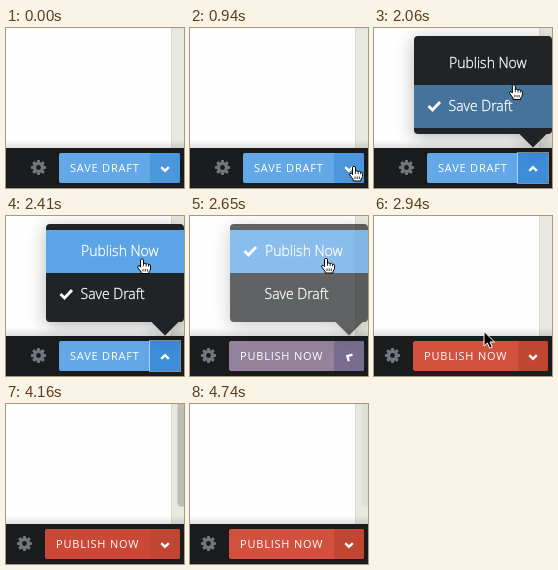
An HTML page for the animation above (4860 ms loop, 178 by 160 pixels).

```html
<!DOCTYPE html>
<html lang="en">
<head>
<meta charset="utf-8">
<title>Publish button</title>
<style>
  html, body { margin: 0; width: 100%; height: 100%; overflow: hidden; background: #fefefe; }
  svg { display: block; width: 100%; height: 100%; }
  text { font-family: "Open Sans", sans-serif; fill: #fff; }
  .label { font-size: 11px; letter-spacing: .8px; }
  .item { font-size: 14px; font-weight: 300; stroke: #fff; stroke-width: .3; }
  .icon { fill: none; stroke: #fff; stroke-width: 2.3; }
  #menu { filter: drop-shadow(0 4px 9px rgba(0, 0, 0, .28)); }
</style>
</head>
<body>
<svg viewBox="0 0 178 160">
  <defs>
    <linearGradient id="fade" x1="0" y1="0" x2="0" y2="1">
      <stop offset="0" stop-color="#000" stop-opacity="0"/>
      <stop offset="1" stop-color="#000" stop-opacity=".12"/>
    </linearGradient>
  </defs>

  <rect width="178" height="160" fill="#fefefe"/>
  <rect x="165" width="13" height="120" fill="#e9e8e0"/>
  <rect x="165" width="1" height="120" fill="#dddcd4"/>
  <rect id="thumb" x="171.5" y="-10" width="10" height="112.5" rx="3.5" fill="#bfbeb5"/>
  <rect y="112" width="178" height="8" fill="url(#fade)"/>
  <rect y="120" width="178" height="40" fill="#191b1d"/>

  <g id="gear" fill="#70787e" stroke="#70787e"></g>

  <rect id="main" y="125" height="30" rx="2"/>
  <path id="caret" d="M144 125h28a2 2 0 0 1 2 2v26a2 2 0 0 1-2 2h-28z"/>
  <rect id="focus" x="143.5" y="124.5" width="31" height="31" fill="none" stroke="#fff" stroke-dasharray="1 1"/>
  <text id="label" class="label" y="144"></text>
  <path id="chevron" class="icon" d="M-3.8-1.9L0 1.9L3.8-1.9"/>

  <g id="menu">
    <path d="M44 8H174a4 4 0 0 1 4 4V102a4 4 0 0 1-4 4H172.5L159 119.5L145.5 106H44a4 4 0 0 1-4-4V12a4 4 0 0 1 4-4z" fill="#212426"/>
    <rect id="rowTop" x="40" y="14" width="138" height="43" fill="#5ba4e5"/>
    <rect id="rowLow" x="40" y="57" width="138" height="43" fill="#5ba4e5"/>
    <path id="check" class="icon" d="M54.5 0L58.5 4L66-4" style="stroke-width:2.8"/>
    <text class="item" x="75" y="40">Publish Now</text>
    <text class="item" x="74.5" y="83">Save Draft</text>
  </g>

  <path id="arrow" d="M0 0V14.5L3.4 11.4L5.7 16.6L8.3 15.5L6 10.4H10.6Z" fill="#000" stroke="#fff" stroke-linejoin="round"/>
  <g id="hand" stroke="#000" stroke-linejoin="round">
    <path d="M-1.5 1.2Q0-.7 1.5 1.2V5.2Q3 4 4.2 5.7Q5.7 4.5 6.5 6.2Q8.4 5.4 8.5 7.6V10.5Q8.3 12 7 13.2V15H-.8V13.5L-4.3 8.8Q-4.5 6.6-2.7 7.4L-1.5 8.6Z" fill="#fff"/>
    <path d="M1.5 5V7.8M4.2 5.6V8M6.5 6.2V8.3M1 10.5V13M3.2 10.5V13M5.3 10.5V13" fill="none" stroke-width=".8"/>
  </g>
</svg>
<script>
const LOOP = 4860, STEP = LOOP / 83;
const el = id => document.getElementById(id);
const set = (id, attrs) => {
  for (const key in attrs) el(id).setAttribute(key, attrs[key]);
};

const BLUE = { main: [98, 168, 231], caret: [76, 151, 219] };
const RED = { main: [209, 80, 62], caret: [192, 69, 50] };
const HOVER = [61, 141, 218];
const PRESSED = [199, 64, 45], FOCUSED = [204, 72, 54];

// time, x, y of the pointer tip
const PATH = [
  [530, 182, 147], [590, 175, 142], [700, 164, 138], [940, 164, 138],
  [1220, 163, 142], [1880, 163, 142], [1935, 156, 112], [1990, 147, 80],
  [2045, 140, 57], [2160, 136, 43], [2650, 136, 42], [2760, 122, 80],
  [2880, 110, 110], [2940, 110, 117], [3280, 109, 139], [3860, 109, 139],
  [3980, 138, 139], [4160, 190, 152]
];

const clamp = v => Math.min(1, Math.max(0, v));
const ramp = (t, a, b) => {
  const p = clamp((t - a) / (b - a));
  return p * p * (3 - 2 * p);
};
const mix = (a, b, p) => a.map((v, i) => v + (b[i] - v) * p);
const rgb = c => `rgb(${c.map(Math.round)})`;

function pointer(t) {
  const i = PATH.findIndex(p => p[0] > t);
  if (i === 0) return PATH[0].slice(1);
  if (i < 0) return PATH[PATH.length - 1].slice(1);
  const a = PATH[i - 1], b = PATH[i];
  return mix(a, b, (t - a[0]) / (b[0] - a[0])).slice(1);
}

function buildGear() {
  let teeth = "";
  for (let a = 0; a < 360; a += 45)
    teeth += `<rect x="-1.6" y="-7.6" width="3.2" height="4" rx=".8" stroke="none" transform="rotate(${a})"/>`;
  el("gear").innerHTML = teeth + '<circle r="4" fill="none" stroke-width="3.2"/>';
}

function draw(time) {
  const t = Math.floor((time % LOOP + 14) / STEP) * STEP;
  const chosen = t >= 2500;
  const left = chosen ? 39 : 53;

  // button
  const tint = ramp(t, 2500, 2790);
  let main = mix(BLUE.main, RED.main, tint);
  if (t >= 3500 && t < 4340) main = t < 3680 ? PRESSED : FOCUSED;
  const blueCaret = mix(BLUE.caret, HOVER, ramp(t, 930, 1160));
  set("main", { x: left, width: 174 - left, fill: rgb(main) });
  set("caret", { fill: rgb(mix(blueCaret, RED.caret, tint)) });
  set("focus", { visibility: t > 1640 && !chosen ? "visible" : "hidden" });
  set("label", { x: chosen ? 50 : 64 });
  el("label").textContent = chosen ? "PUBLISH NOW" : "SAVE DRAFT";
  set("gear", { transform: `translate(${chosen ? 18.5 : 32.5} 139.5)` });
  const turn = 180 * (ramp(t, 1440, 1600) - ramp(t, 2520, 2815));
  set("chevron", { transform: `translate(159 141) rotate(${turn})` });

  // menu
  const shown = ramp(t, 1495, 1710) * (1 - ramp(t, 2515, 2855));
  set("menu", { opacity: shown, visibility: shown > 0 ? "visible" : "hidden" });
  set("rowTop", { opacity: ramp(t, 2050, 2230) });
  set("rowLow", { opacity: .62 * ramp(t, 1900, 2040) * (1 - ramp(t, 2060, 2230)) });
  set("check", { transform: `translate(0 ${chosen ? 35 : 78})` });

  // pointer
  const [x, y] = pointer(t);
  const moving = t > 560 && t < 4160;
  const isHand = t >= 930 && t < 2660 || y >= 126 && t > 2900 && x < 174;
  const at = `translate(${x} ${y})`;
  set("hand", { transform: at, visibility: moving && isHand ? "visible" : "hidden" });
  set("arrow", { transform: at, visibility: moving && !isHand ? "visible" : "hidden" });

  set("thumb", { opacity: ramp(t, 3900, 4140) * (1 - .8 * ramp(t, 4570, 4750)) });
}

buildGear();
const start = performance.now();
function tick() {
  draw(performance.now() - start);
  requestAnimationFrame(tick);
}
tick();
</script>
</body>
</html>
```
